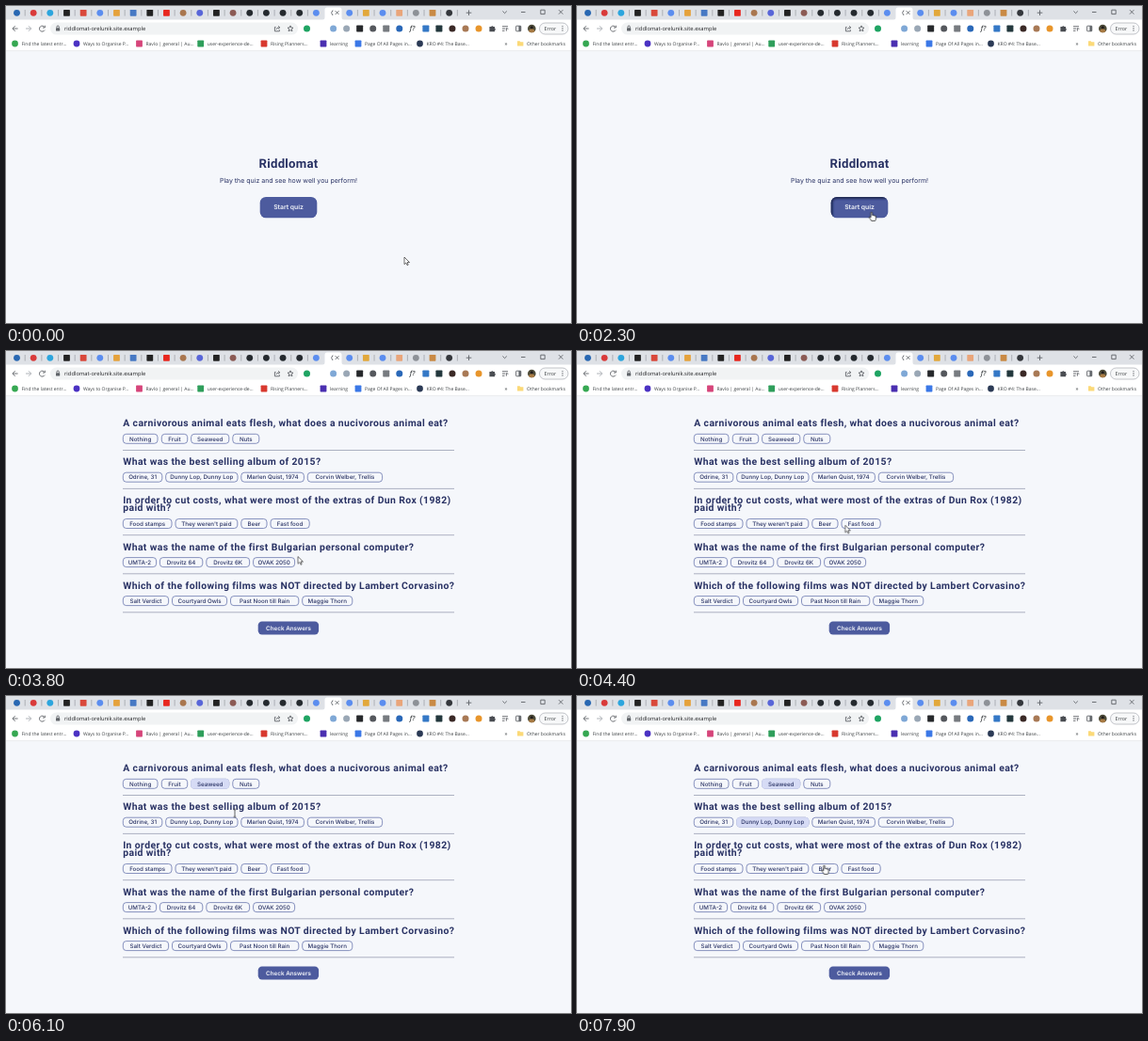
Recreate the animation shown at these times as an HTML page. Size 600x337 px, loop 8000 ms.

```html
<!DOCTYPE html>
<html lang="en">
<head>
<meta charset="utf-8">
<title>Quiz in a browser</title>
<style>
html, body { margin: 0; width: 100%; height: 100%; overflow: hidden; background: #f5f7fb; }
svg { display: block; width: 100vw; height: 100vh; }
text { text-rendering: geometricPrecision; white-space: pre; }
.bar { font: 5px "Open Sans", "Noto Sans", sans-serif; fill: #3c4043; }
.url { font-size: 5.8px; fill: #202124; }
.head { font: 700 10.4px Roboto, sans-serif; letter-spacing: .395px; fill: #293264; }
.title { font: 700 13.2px Roboto, sans-serif; letter-spacing: .25px; fill: #293264; }
.sub { font: 7px Inter, sans-serif; fill: #293264; }
.opt { font: 500 6.2px Inter, sans-serif; fill: #293264; }
.btn { font: 600 6.8px Inter, sans-serif; fill: #f5f7fb; }
.check { font-size: 6.3px; }
.mid { text-anchor: middle; }
.line { fill: none; stroke: #5f6368; stroke-width: .9; }

.step { animation: 8s step-end infinite; }
#intro { animation-name: intro; }
#quiz { animation-name: quiz; }
#press { animation-name: press; }
#pickA { animation-name: pickA; }
#pickB { animation-name: pickB; }
#arrow { animation-name: arrow; }
#hand { animation-name: hand; }
#beam { animation-name: beam; }
#cursor { animation: move 8s ease-in-out infinite; }

@keyframes intro { 0% { opacity: 1 } 46.25%, 100% { opacity: 0 } }
@keyframes quiz { 0% { opacity: 0 } 46.25%, 100% { opacity: 1 } }
@keyframes press { 0% { opacity: 0 } 17.5%, 100% { opacity: 1 } }
@keyframes pickA { 0% { opacity: 0 } 68.75%, 100% { opacity: 1 } }
@keyframes pickB { 0% { opacity: 0 } 86.25%, 100% { opacity: 1 } }
@keyframes arrow {
  0%, 46.25%, 71.5%, 79%, 90.5% { opacity: 1 }
  17.5%, 66%, 73%, 81%, 93%, 100% { opacity: 0 }
}
@keyframes hand {
  17.5%, 66%, 81%, 97.5%, 100% { opacity: 1 }
  0%, 46.25%, 71.5%, 90.5% { opacity: 0 }
}
@keyframes beam {
  73%, 93% { opacity: 1 }
  0%, 79%, 97.5%, 100% { opacity: 0 }
}
@keyframes move {
  0% { transform: translate(423px, 267px) }
  11.25%, 14.5% { transform: translate(311.7px, 234px) }
  19%, 46.24% { transform: translate(312.7px, 219px) }
  46.25%, 50% { transform: translate(310px, 218.5px) }
  63.75% { transform: translate(219px, 98.5px) }
  66%, 70% { transform: translate(217.5px, 94px) }
  76.25% { transform: translate(243px, 124.5px) }
  83.5%, 88% { transform: translate(215px, 134px) }
  98.5%, 100% { transform: translate(262.5px, 180px) }
}
</style>
</head>
<body>
<svg viewBox="0 0 600 337" preserveAspectRatio="none">
  <defs>
    <clipPath id="inside"><rect x="269.7" y="203" width="60.6" height="22.3" rx="6.3"/></clipPath>
    <filter id="soft" x="-20%" y="-40%" width="140%" height="180%"><feGaussianBlur stdDeviation="1.2"/></filter>
  </defs>
  <rect width="600" height="337" fill="#f5f7fb"/>

  <g id="intro" class="step">
    <text class="title mid" x="300" y="172.4">Riddlomat</text>
    <text class="sub mid" x="300" y="187.6">Play the quiz and see how well you perform!</text>
    <rect x="269.7" y="203" width="60.6" height="22.3" rx="6.3" fill="#4d5b9e"/>
    <g id="press" class="step" clip-path="url(#inside)">
      <path d="M269.5 226V209Q269.5 203 276 203H331" fill="none" stroke="#1d2550" stroke-width="4" filter="url(#soft)"/>
    </g>
    <text class="btn mid" x="300" y="216.4">Start quiz</text>
  </g>

  <g id="quiz" class="step">
    <g id="rows"></g>
    <rect x="267.7" y="287.4" width="64.4" height="14" rx="4.2" fill="#4d5b9e"/>
    <text class="btn check mid" x="300" y="296.7">Check Answers</text>
  </g>

  <g id="chrome">
    <rect width="600" height="15" fill="#dee1e6"/>
    <rect y="14.5" width="600" height="33" fill="#fff"/>
    <path d="M0 47.6H600" stroke="#e4e6ea" stroke-width=".7"/>
    <path d="M335.5 15Q338.5 15 338.5 12V4Q338.5 1.5 341 1.5H354Q356.5 1.5 356.5 4V12Q356.5 15 359.5 15Z" fill="#fff"/>
    <g id="tabs"></g>
    <path class="line" d="M347 4.5Q344.2 7.2 347 10M349.7 5.2L353.5 9M353.5 5.2L349.7 9M488.7 7.2H494.3M491.5 4.4V10"/>
    <path class="line" d="M527.4 5.5L529.6 7.7L531.8 5.5M547 6.5H551.5M567.8 4.2H572.2V8.6H567.8ZM587 4.2L591.4 8.6M591.4 4.2L587 8.6" stroke-width=".7"/>

    <rect x="47" y="17.6" width="263" height="13" rx="6.5" fill="#f1f3f4"/>
    <path class="line" d="M12.6 24H7M9.7 21.2L6.9 24L9.7 26.8M41 22.5A3 3 0 1 0 41.1 25.6M41.3 20.7V23H39"/>
    <path class="line" d="M21 24H26.6M23.9 21.2L26.7 24L23.9 26.8" style="stroke:#a6aab0"/>
    <path class="line" d="M53.9 23.4V22.2A1.2 1.2 0 0 1 56.3 22.2V23.4"/>
    <rect x="53" y="23.2" width="4.2" height="3.3" rx=".5" fill="#5f6368"/>
    <text class="bar url" x="62" y="26">riddlomat-orelunik.site.example</text>
    <path class="line" d="M286.6 22.4H285.4V26.8H290.4V25.3M287 25Q287.3 22.8 290.6 22.8M289.2 21.3L290.8 22.8L289.2 24.4" stroke-width=".7"/>
    <path class="line" d="M302 20.9L302.9 23L305 23.2L303.4 24.6L303.9 26.8L302 25.6L300.1 26.8L300.6 24.6L299 23.2L301.1 23Z" stroke-width=".7"/>
    <g id="tools"></g>
    <text class="bar" x="428.8" y="26.4" style="font-style:italic;font-size:7px;font-weight:600">f?</text>
    <path d="M513.4 22H515.2A1.2 1.2 0 0 1 517.5 22H519V23.7A1.2 1.2 0 0 1 519 26V27.3H513.4Z" fill="#4a4d52"/>
    <path class="line" d="M527 21.7H533M527 24H530.3M527 26.3H529.5M531.4 26.6V23.5L533.4 24.3"/>
    <rect class="line" x="541.6" y="21.2" width="5.2" height="5.6" rx=".6"/>
    <path d="M544.4 21.2H546.8V26.8H544.4Z" fill="#5f6368"/>
    <circle cx="558.3" cy="24" r="4.3" fill="#4c4a38"/>
    <path d="M555 26.7A3.5 3.5 0 0 1 561.6 26.7A4.3 4.3 0 0 1 555 26.7Z" fill="#a77a43"/>
    <circle cx="558.3" cy="22.7" r="1.5" fill="#221d1b"/>
    <rect x="566.5" y="18" width="30.5" height="12" rx="6" fill="#f7f8f9" stroke="#a9adb3" stroke-width=".7"/>
    <text class="bar" x="571.5" y="26" style="font-size:5.4px">Error</text>
    <path d="M591 21.5V27" stroke="#4a4d52" stroke-width="1.2" stroke-dasharray="0 2.2" stroke-linecap="round"/>

    <g id="marks"></g>
    <text class="bar" x="529.5" y="41.8" style="font-size:6px">»</text>
    <path d="M543 37.3H545.6L546.4 38.2H549.4V42.6H543Z" fill="#fbd978"/>
    <text class="bar" x="553" y="41.8">Other bookmarks</text>
  </g>

  <g id="cursor">
    <path id="arrow" class="step" d="M0 0V7.6L1.8 6L3 8.6L4.2 8.1L3.1 5.5H5.5Z" fill="#fff" stroke="#111" stroke-width=".6"/>
    <path id="hand" class="step" d="M-.8 .6Q0-.6 .8 .6V3.5Q1.8 2.9 2.2 3.8Q3.1 3.3 3.5 4.2Q4.7 3.8 4.7 5V7Q4.5 8.2 3.9 9.4H-.2Q-1 7.8-2.6 5.7Q-2.3 4.6-.8 5.7Z" fill="#fff" stroke="#111" stroke-width=".7"/>
    <path id="beam" class="step" d="M-1.4-4H1.4M0-4V4M-1.4 4H1.4" fill="none" stroke="#222" stroke-width=".7"/>
  </g>
</svg>
<script>
const NS = "http://www.w3.org/2000/svg";
const byId = id => document.getElementById(id);

function add(parent, tag, attrs, label) {
  const el = document.createElementNS(NS, tag);
  for (const key in attrs) el.setAttribute(key, attrs[key]);
  if (label) el.textContent = label;
  parent.append(el);
  return el;
}

// Plain stand-in icon: a circle, or a rounded square when `square` is set.
function icon(parent, x, y, fill, square, r = 3.4) {
  if (square) add(parent, "rect", { x: x - r, y: y - r, width: 2 * r, height: 2 * r, rx: .7, fill });
  else add(parent, "circle", { cx: x, cy: y, r, fill });
}

const tabs = byId("tabs");
const tabColors = ("#2867b2 #d93a3a #2ca5dd *#222 *#d9483b #5b8def *#e5a23c *#4779c4 *#222 *#e8271f " +
  "#a9764f #5865d8 *#222 #8b5a54 #24292e #24292e #24292e #24292e #5b8def - " +
  "#5b8def *#e2a83b #5b8def *#e9a57a #8d9197 *#c98a45 #33363b").split(" ");
tabColors.forEach((c, i) => {
  const x = 11.5 + i * 17.66;
  if (c !== "-") icon(tabs, x, 7.3, c.replace("*", ""), c[0] === "*");
  if (i < 18 || i > 19) add(tabs, "path", { d: `M${x + 8.7} 4V10.6`, stroke: "#8b8f96", "stroke-width": .6 });
});

const toolColors = ("#1fa463 - #7fa8d6 #9aa7b5 *#26282b #55585d *#777b80 #2a68b8 - *#3478c6 " +
  "*#23383d #3a2926 #a87955 #e8952b").split(" ");
toolColors.forEach((c, i) => {
  if (c !== "-") icon(byId("tools"), 319.5 + i * 14.04, 24, c.replace("*", ""), c[0] === "*", 3.5);
});

const marks = [
  [9.5, "#36a852", 0, "Find the latest entr..."],
  [75, "#4b32c3", 0, "Ways to Organise P..."],
  [141.5, "#d6457a", 1, "Ravlo | general | Au..."],
  [206.7, "#2f9e5b", 1, "user-experience-de..."],
  [274, "#d8392f", 1, "Rising Planners..."],
  [337, "#4a2fb0", 1, "learning"],
  [374, "#3b78e7", 1, "Page Of All Pages in..."],
  [439.5, "#2b3a55", 0, "KRO #4: The Base..."]
];
for (const [x, color, square, label] of marks) {
  icon(byId("marks"), x, 40, color, square);
  add(byId("marks"), "text", { class: "bar", x: x + 7, y: 41.8 }, label);
}

// Each question: rule y, heading lines, then [left, right, label] per option.
const questions = [
  [105.5, ["A carnivorous animal eats flesh, what does a nucivorous animal eat?"],
    [[124.3, 161, "Nothing"], [165.3, 192.7, "Fruit"], [196.6, 236.8, "Seaweed", "pickA"], [240.8, 268.8, "Nuts"]]],
  [146.4, ["What was the best selling album of 2015?"],
    [[124.3, 165.8, "Odrine, 31"], [169.7, 246, "Dunny Lop, Dunny Lop", "pickB"],
      [249.8, 316.4, "Marlen Quist, 1974"], [320.3, 399.6, "Corvin Welber, Trellis"]]],
  [195.7, ["In order to cut costs, what were most of the extras of Dun Rox (1982)", "paid with?"],
    [[124.3, 176, "Food stamps"], [180, 245.8, "They weren't paid"], [249.8, 277, "Beer"], [281, 322.2, "Fast food"]]],
  [236.8, ["What was the name of the first Bulgarian personal computer?"],
    [[124.3, 159.6, "UMTA-2"], [163.4, 208.8, "Drovitz 64"], [212.8, 258.6, "Drovitz 6K"], [262.6, 306.6, "OVAK 2050"]]],
  [277.8, ["Which of the following films was NOT directed by Lambert Corvasino?"],
    [[124.3, 172.6, "Salt Verdict"], [176.5, 234.6, "Courtyard Owls"],
      [238.5, 310.8, "Past Noon till Rain"], [314.7, 367.8, "Maggie Thorn"]]]
];

const rows = byId("rows");
for (const [rule, lines, options] of questions) {
  lines.forEach((line, i) => {
    const y = rule - 25.3 - (lines.length - 1 - i) * 8.5;
    add(rows, "text", { class: "head", x: 124.2, y }, line);
  });
  for (const [left, right, label, pick] of options) {
    const box = { x: left, y: rule - 17.2, width: right - left, height: 10, rx: 3.4 };
    add(rows, "rect", { ...box, fill: "#f5f7fb", stroke: "#4d5b9e", "stroke-width": .65 });
    if (pick) {
      add(rows, "rect", { ...box, id: pick, class: "step", fill: "#d6dbf5", stroke: "#d6dbf5", "stroke-width": .8 });
    }
    add(rows, "text", { class: "opt mid", x: (left + right) / 2, y: rule - 10 }, label);
  }
  add(rows, "path", { d: `M124 ${rule}H476`, stroke: "#9a9fb3", "stroke-width": .8 });
}
</script>
</body>
</html>
```
